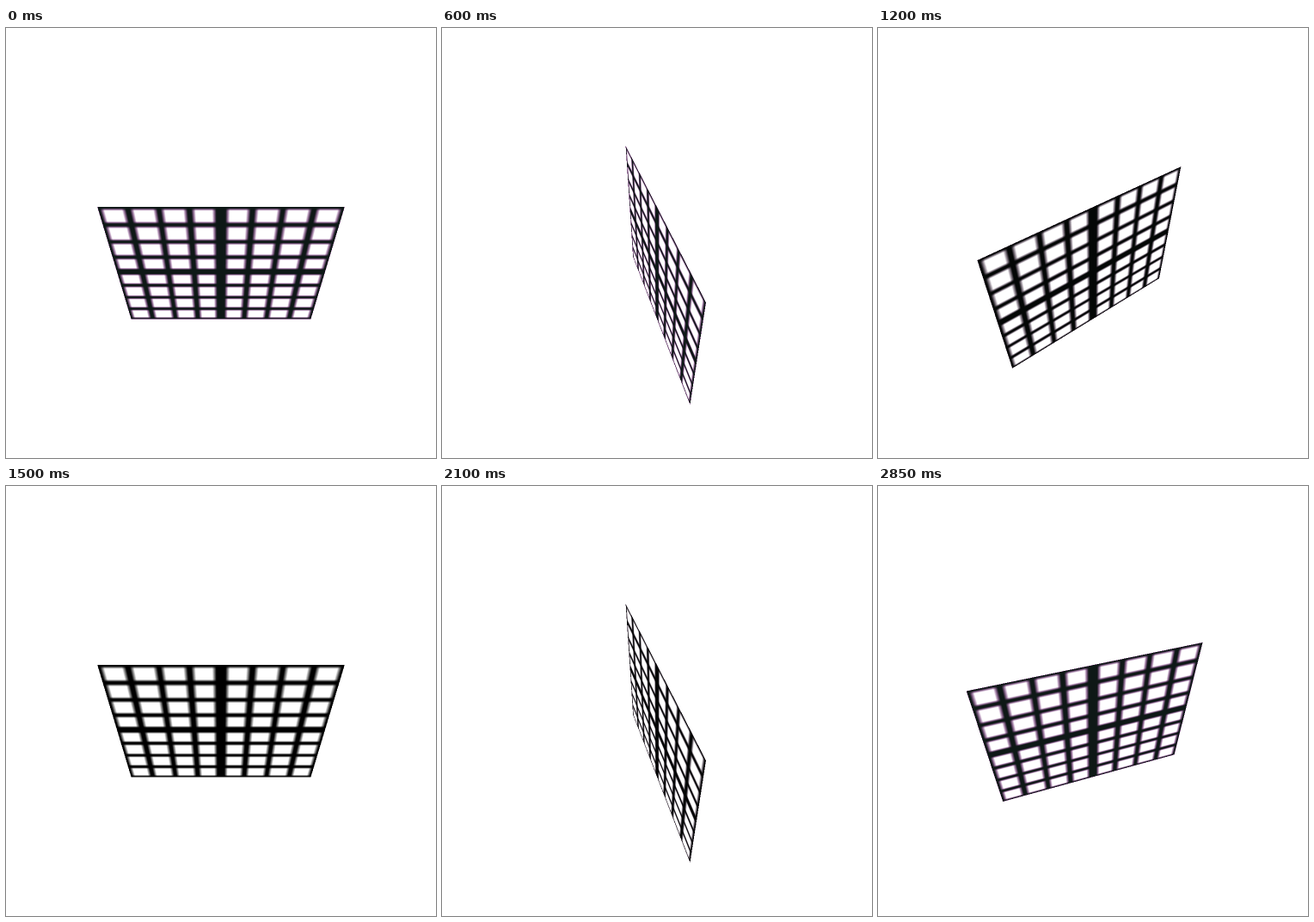
An HTML page with a canvas that plays this animation: 500x500 px, repeating every 3 s.

```html
<!DOCTYPE html>
<html>
<head>
<meta charset="utf-8">
<style>
  html, body { margin: 0; height: 100%; overflow: hidden; background: #fff; }
  canvas { display: block; }
</style>
</head>
<body>
<canvas id="stage" width="500" height="500"></canvas>
<script>
const ctx = document.getElementById('stage').getContext('2d');
const STEP = 150, STEPS = 20;
const LEFT = 98, TOP = 134, WIDTH = 304, HEIGHT = 310;
const image = ctx.createImageData(WIDTH, HEIGHT);

// Projection of the panel: u, v in [-1, 1], spinning about its tilted axis
//   w = 1 + P v - Q u sin,  x = 250 + A u cos / w,  y = (MID + B v + C u sin) / w
const MID = 283.5, A = 121, B = 108.2, C = 36, P = 0.158, Q = 0.195;

// Panes along one half of the panel, with soft edges
const PANES = [[0.055, 0.225], [0.29, 0.475], [0.535, 0.725], [0.79, 0.968]];
const SOFT = 0.035, RES = 1000;
const clamp = n => Math.min(1, Math.max(0, n));
const paneLight = Float32Array.from({ length: RES + 1 }, (_, i) =>
  Math.max(...PANES.map(([lo, hi]) =>
    clamp((i / RES - lo) / SOFT + 0.5) * clamp((hi - i / RES) / SOFT + 0.5))));

function light(x, y, cos, sin) {
  const a = A * cos + x * Q * sin, b = B - y * P, c = sin * (C + y * Q);
  const det = a * b + x * P * c;
  const u = Math.abs(x * (b + P * (y - MID)) / det);
  const v = Math.abs((a * (y - MID) - c * x) / det);
  if (!(u <= 1 && v <= 1)) return 1;
  return paneLight[Math.round(u * RES)] * paneLight[Math.round(v * RES)];
}

function draw(step) {
  const angle = step / STEPS * 2 * Math.PI;
  const cos = Math.cos(angle), sin = Math.sin(angle);
  const tint = clamp(Math.cos(angle - 0.35) * 1.2 + 0.95);
  const px = image.data;
  for (let j = 0, k = 0; j < HEIGHT; j++) {
    for (let i = 0; i < WIDTH; i++, k += 4) {
      let sum = 0;
      for (const dy of [0.25, 0.75])
        for (const dx of [0.25, 0.75])
          sum += light(LEFT + i + dx - 250, TOP + j + dy, cos, sin);
      const l = sum / 4, dark = (1 - l) * tint, fringe = 4 * l * dark;
      px[k] = 255 * l + 14 * dark + 8 * fringe;
      px[k + 1] = 255 * l + 24 * dark - 28 * fringe;
      px[k + 2] = 255 * l + 22 * dark + 8 * fringe;
      px[k + 3] = 255;
    }
  }
  ctx.putImageData(image, LEFT, TOP);
}

let shown = -1;
function tick() {
  const step = Math.floor(performance.now() / STEP) % STEPS;
  if (step !== shown) draw(shown = step);
  requestAnimationFrame(tick);
}
tick();
</script>
</body>
</html>
```
